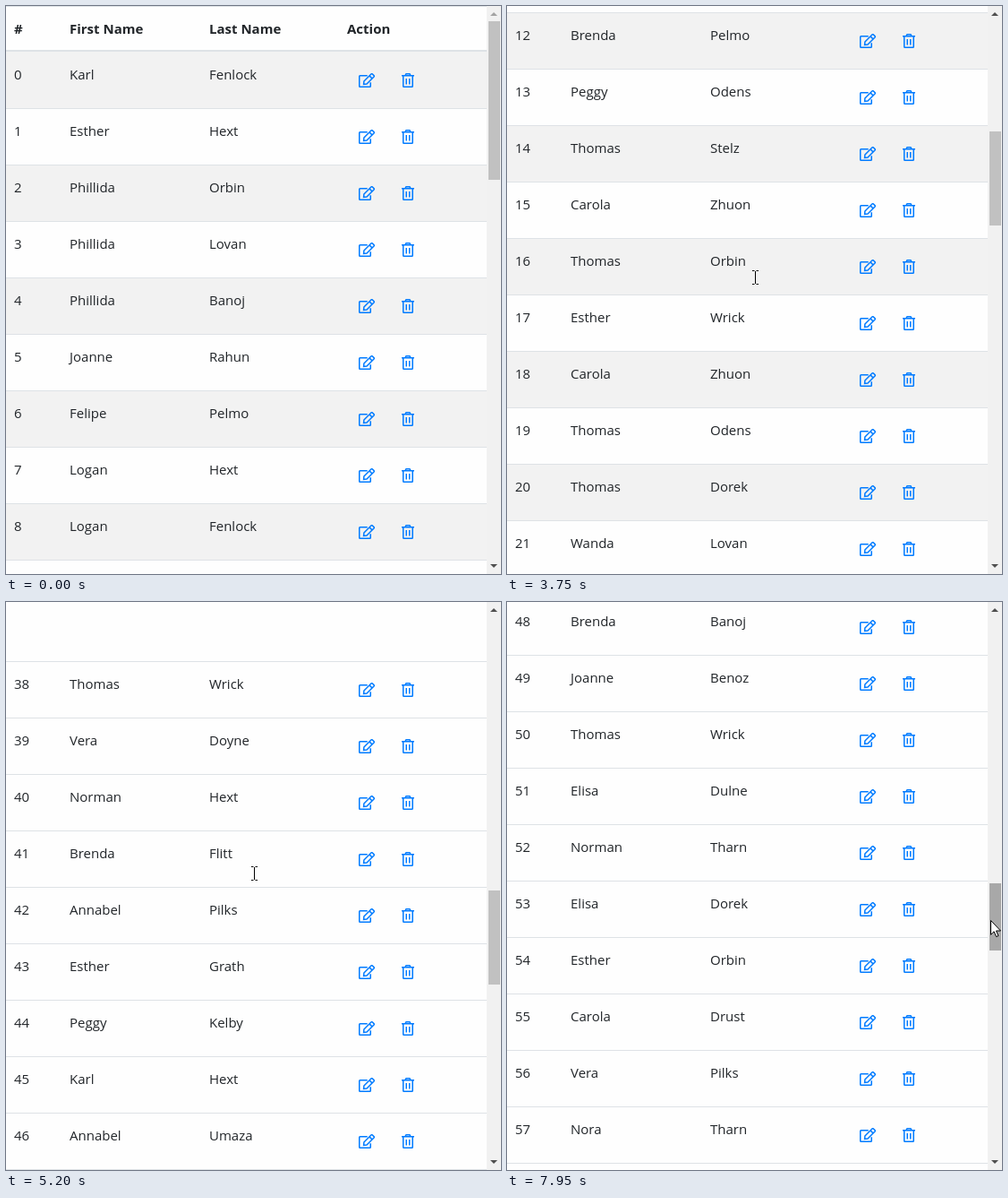
These frames come from a looping animation (553 px wide and 634 px high, 8000 ms). An HTML page:

```html
<!DOCTYPE html>
<html lang="en">
<head>
<meta charset="utf-8">
<title>Scrolling table</title>
<style>
  html, body { margin: 0; width: 100%; height: 100%; overflow: hidden; background: #fff; }
  #stage { position: relative; width: 553px; height: 634px; overflow: hidden; background: #fefefe;
    font: 15px/24px "Open Sans", "Noto Sans", sans-serif; color: #212529; }
  #table { position: absolute; left: 0; top: 0; width: 537px; }
  .row { position: absolute; left: 0; width: 537px; height: 63px; box-sizing: border-box;
    border-top: 1px solid #dee2e6; }
  .row.odd { background: #f2f2f2; }
  .row.first { border-top-color: transparent; }
  .head { top: 0; height: 51px; border-bottom: 2px solid #dee2e6; font-weight: 700; }
  .row span { position: absolute; top: 12px; }
  .row span:nth-child(1) { left: 9px; }
  .row span:nth-child(2) { left: 71px; }
  .row span:nth-child(3) { left: 227px; }
  .row span:nth-child(4) { left: 381px; }
  .row svg { position: absolute; left: 394px; top: 23px; fill: none; stroke: #007bff; stroke-width: 1.5; }
  #bar { position: absolute; left: 537px; top: 0; width: 16px; height: 634px; background: #f1f1f1; }
  #thumb { position: absolute; left: 2px; width: 13px; background: #c1c1c1; }
  #thumb.hover { background: #a8a8a8; }
  #bar svg, #cursor { position: absolute; left: 0; top: 0; overflow: visible; }
</style>
</head>
<body>
<div id="stage">
  <div id="table">
    <div class="row head"><span>#</span><span>First Name</span><span>Last Name</span><span>Action</span></div>
  </div>
  <div id="bar">
    <svg width="16" height="634" fill="#505050">
      <path id="up" d="M4 11l4-4 4 4z"/><path d="M4 623h8l-4 4z"/>
    </svg>
    <div id="thumb"></div>
  </div>
  <svg id="cursor" width="13" height="20">
    <path id="arrow" d="M.5.5v15.8l3.6-3.5 2.5 5.8 2.4-1-2.5-5.6h5z" fill="#fff" stroke="#000"/>
    <path id="beam" d="M-2 -7.5h2.5M2.5 -7.5h2.5M1.5 -7v14M-2 7.5h2.5M2.5 7.5h2.5" fill="none" stroke="#000"/>
  </svg>
</div>
<svg width="0" height="0" style="position:absolute">
  <symbol id="icons" viewBox="0 0 64 17">
    <path d="M9.7 2.75H1.5a.75.75 0 0 0-.75.75v11c0 .4.3.75.75.75h11c.4 0 .75-.3.75-.75v-4.2"/>
    <path d="M5.9 9L13.9 1a1.1 1.1 0 0 1 1.5 0L17 2.6a1.1 1.1 0 0 1 0 1.5L9 12.1l-3.4.4zM12 2.9l3.1 3.1"/>
    <path d="M48 2.75h14M52 2.5l1-1.75h4l1 1.75M49.75 3v11.5c0 .4.3.75.75.75h9c.4 0 .75-.3.75-.75V3M53.25 6v6.5M56.75 6v6.5"/>
  </symbol>
</svg>
<script>
const LOOP = 8000, ROW = 63, HEAD = 51, VIEW = 634, STRIPED = 32;
// Skipped rows are estimated this much too short by the virtual list.
const SLACK = 14;

const people = `Karl Fenlock,Esther Hext,Phillida Orbin,Phillida Lovan,Phillida Banoj,Joanne Rahun,
Felipe Pelmo,Logan Hext,Logan Fenlock,Vera Desal,Helga Waler,Elisa Fenlock,Brenda Pelmo,Peggy Odens,
Thomas Stelz,Carola Zhuon,Thomas Orbin,Esther Wrick,Carola Zhuon,Thomas Odens,Thomas Dorek,Wanda Lovan,
Karl Wrick,Vera Pelmo,Logan Desal,Helga Hext,Joanne Orbin,Elisa Stelz,Wanda Waler,
Esther Stelz,Peggy Fenlock,Joanne Flitt,Carola Lovan,Joanne Doyne,Karl Pelmo,Annabel Hext,Peggy Hext,
Carola Pelmo,Thomas Wrick,Vera Doyne,Norman Hext,Brenda Flitt,Annabel Pilks,Esther Grath,Peggy Kelby,
Karl Hext,Annabel Umaza,Nora Pilks,Brenda Banoj,Joanne Benoz,Thomas Wrick,Elisa Dulne,Norman Tharn,
Elisa Dorek,Esther Orbin,Carola Drust,Vera Pilks,Nora Tharn,Logan Kelby`.split(/,\s*/);

// [time, scroll offset, first rendered row]
const scrolls = [
  [0, 0, 0], [760, 100, 0], [910, 200, 0], [1060, 300, 0],
  [1290, 400, 5], [1380, 500, 7], [1440, 600, 9], [1540, 700, 12],
  ...[1630, 1850, 2010, 2100, 2320, 2570, 2790, 2950, 3190, 3440].map((t, i) => [t, 700, i % 2 ? 12 : 4]),
  [3660, 800, 12], [3750, 800, 4], [3810, 900, 4], [3880, 1000, 5], [3960, 1100, 5], [4110, 1100, 19],
  [4260, 1200, 19], [4340, 1300, 21], [4420, 1400, 23], [4500, 1600, 25], [4580, 1779, 29], [4650, 1879, 29],
  [5080, 2079, 32], [5140, 2279, 36], [5200, 2379, 38], [5260, 2579, 40],
  [6030, 2679, 40], [6120, 2779, 40], [6200, 2879, 40], [6270, 2979, 40], [6420, 3079, 40]
];
const thumbs = [[0, 177], [1140, 105], [6030, 75]];
const pointer = [
  [370, 540, 180], [700, 276, 297], [1440, 276, 297], [1540, 276, 303],
  [6890, 276, 303], [7490, 543, 349], [7740, 543, 349], [7950, 540, 355]
];

const $ = id => document.getElementById(id);
const table = $("table"), thumb = $("thumb"), cursor = $("cursor");

const rows = people.map((name, i) => {
  const row = document.createElement("div");
  row.style.top = HEAD + i * ROW + "px";
  row.innerHTML = [i, ...name.split(" ")].map(s => `<span>${s}</span>`).join("") +
    '<svg width="64" height="17"><use href="#icons"/></svg>';
  table.append(row);
  return row;
});

const at = (list, t) => list.filter(k => k[0] <= t).pop();

function pointerAt(t) {
  const a = at(pointer, t) || pointer[0];
  const b = pointer[pointer.indexOf(a) + 1];
  if (!b) return [a[1], a[2]];
  const p = Math.max(0, (t - a[0]) / (b[0] - a[0]));
  const e = p * p * (3 - 2 * p);
  return [1, 2].map(k => Math.round(a[k] + (b[k] - a[k]) * e));
}

let shown;
function showRows(first) {
  if (first === shown) return;
  shown = first;
  rows.forEach((row, i) => {
    const odd = (i - first) % 2 === 0 && i < STRIPED;
    row.className = "row" + (odd ? " odd" : "") + (i ? "" : " first");
    row.style.visibility = i < first ? "hidden" : "visible";
  });
}

function draw(t) {
  const [, y, first] = at(scrolls, t);
  const size = at(thumbs, t)[1];
  showRows(first);
  table.style.transform = `translateY(${-y}px)`;
  thumb.style.height = size + "px";
  thumb.style.top = 17 + Math.floor((y - SLACK * first) * size / VIEW) + "px";
  $("up").setAttribute("fill", y ? "#505050" : "#a3a3a3");

  const [cx, cy] = pointerAt(t);
  const beam = t >= 1540 && t < 6030;
  cursor.style.visibility = t < 370 ? "hidden" : "visible";
  cursor.style.transform = `translate(${cx}px,${cy}px)`;
  $("arrow").style.display = beam ? "none" : "";
  $("beam").style.display = beam ? "" : "none";
  thumb.className = t > 6890 && cx >= 538 ? "hover" : "";
}

const start = performance.now();
function tick() {
  draw((performance.now() - start) % LOOP);
  requestAnimationFrame(tick);
}
tick();
</script>
</body>
</html>
```
